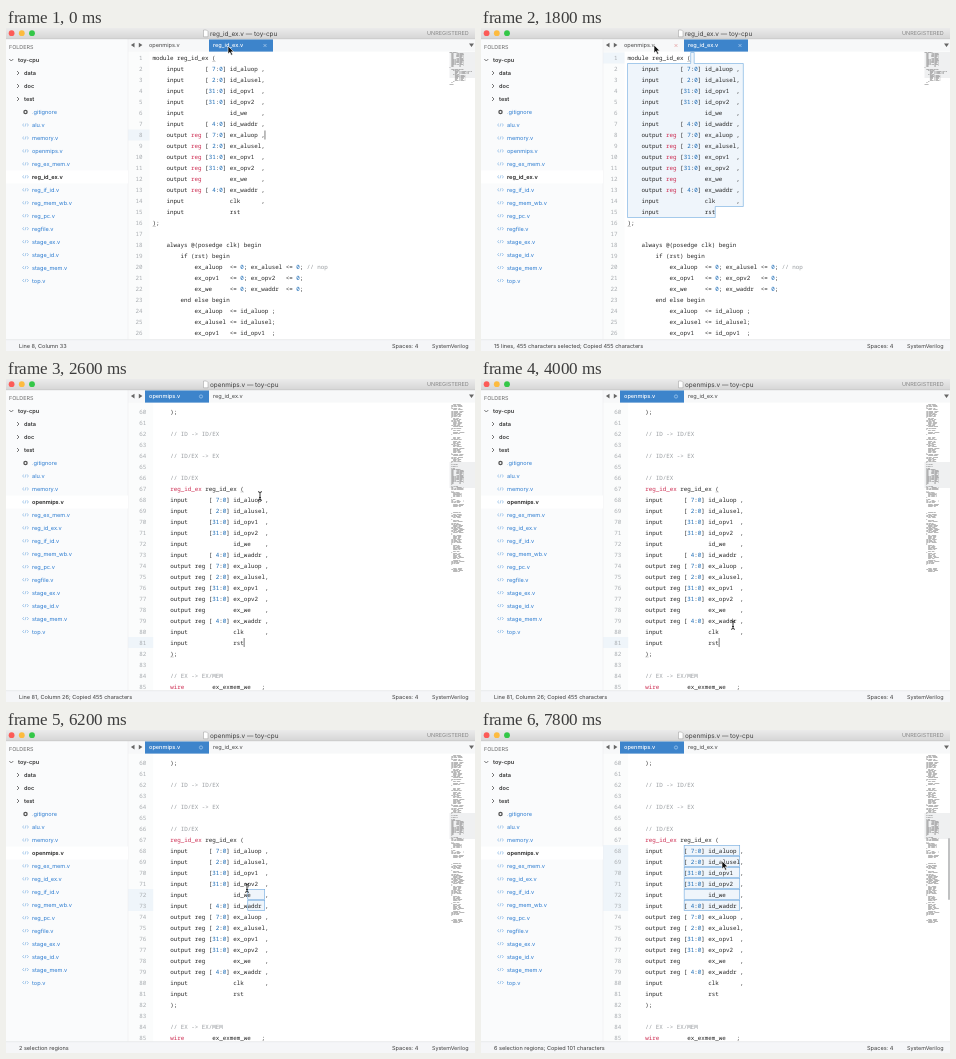
An HTML page for the animation above (8 s loop, 469 by 323 pixels).

```html
<!DOCTYPE html>
<html lang="en">
<head>
<meta charset="utf-8">
<title>Code editor</title>
<style>
html, body { margin: 0; width: 100%; height: 100%; overflow: hidden; background: #fff; }
svg { display: block; width: 469px; height: 323px; }
text { font: 5.6px Inter, sans-serif; fill: #3c3c3c; white-space: pre; text-rendering: geometricPrecision; }
.code text { font: 5.85px "Noto Sans Mono", monospace; fill: #262626; }
.code .num { fill: #a8acb0; text-anchor: end; }
.comment { fill: #979b9f; }
.keyword { fill: #cc2b50; }
.number { fill: #1769b5; }
.file { fill: #2b7bd0; }
.bold { font-weight: 600; fill: #333; }
.active { font-weight: 600; fill: #222; }
.line { fill: none; stroke: #555; stroke-width: .8; }
.sel { fill: #eff5fb; stroke: #6fa9df; stroke-width: .6; }
</style>
</head>
<body>
<svg viewBox="0 0 469 323">
  <defs>
    <linearGradient id="bar" x2="0" y2="1"><stop stop-color="#ebebeb"/><stop offset="1" stop-color="#d5d5d5"/></linearGradient>
  </defs>
  <rect width="469" height="323" fill="#fff"/>
  <g id="marks"></g>
  <g id="code" class="code"></g>
  <g id="map"></g>
  <g id="caret"></g>
  <rect x="122" y="11" width="347" height="12.6" fill="#f7f8f9"/>
  <g id="tabs"></g>
  <path d="M128.5 14.8v4.6l-3.6-2.3zM132.8 14.8v4.6l3.6-2.3zM463 15.5h5l-2.5 3.6z" fill="#666"/>
  <rect y="11" width="122" height="301" fill="#fafbfc"/>
  <path d="M122 11V312" stroke="#e8eaec" stroke-width=".5"/>
  <g id="side"></g>
  <rect y="311.5" width="469" height="11.5" fill="#f5f6f8"/>
  <path d="M0 311.7H469" stroke="#dfe2e5" stroke-width=".6"/>
  <text id="status" x="13" y="319.5" style="font-size:5.55px"></text>
  <text x="386" y="319.5">Spaces: 4</text>
  <text x="426" y="319.5" style="font-size:5.4px">SystemVerilog</text>
  <rect width="469" height="11" fill="url(#bar)"/>
  <path d="M0 10.8H469" stroke="#bcbcbc" stroke-width=".5"/>
  <circle cx="5.6" cy="5.2" r="2.9" fill="#fc5b57"/>
  <circle cx="15.8" cy="5.2" r="2.9" fill="#fdbb3f"/>
  <circle cx="26" cy="5.2" r="2.9" fill="#34c748"/>
  <path d="M197.5 2h3l1.5 1.5V8.8h-4.5z" fill="#fff" stroke="#999" stroke-width=".5"/>
  <text id="title" x="204" y="7.6" style="font-size:6.4px"></text>
  <text x="421" y="7.3" style="fill:#888;font-size:5.5px">UNREGISTERED</text>
  <g id="mouse"></g>
</svg>
<script>
const $ = id => document.getElementById(id);
const CHAR = 3.51, ROW = 11, FRAME = 200, LOOP = 8000;

const ports = [
  ...["[ 7:0] id_aluop ,", "[ 2:0] id_alusel,", "[31:0] id_opv1  ,", "[31:0] id_opv2  ,",
    "       id_we    ,", "[ 4:0] id_waddr ,"].map(p => "    input      " + p),
  ...["[ 7:0] ex_aluop ,", "[ 2:0] ex_alusel,", "[31:0] ex_opv1  ,", "[31:0] ex_opv2  ,",
    "       ex_we    ,", "[ 4:0] ex_waddr ,"].map(p => "    output reg " + p),
  "    input             clk      ,",
  "    input             rst"
];

const signals = ["aluop ", "alusel", "opv1  ", "opv2  ", "we    ", "waddr "];
const registerLines = ["module reg_id_ex (", ...ports, ");", "",
  "    always @(posedge clk) begin",
  "        if (rst) begin",
  "            ex_aluop  <= 0; ex_alusel <= 0; // nop",
  "            ex_opv1   <= 0; ex_opv2   <= 0;",
  "            ex_we     <= 0; ex_waddr  <= 0;",
  "        end else begin",
  ...signals.map(s => `            ex_${s} <= id_${s};`),
  "        end", "    end", "", "endmodule"];

// Lines outside the visible area only appear in the minimap.
let seed = 7;
const random = () => (seed = seed * 16807 % 2147483647) / 2147483647;
const filler = count => Array.from({ length: count }, () => {
  const r = random();
  if (r < .14) return "";
  if (r < .25) return "    );";
  return "    " + (r < .6 ? "wire " : "    .") + "x".repeat(4 + random() * 7) +
    " ".repeat(1 + random() * 3) + "x".repeat(3 + random() * 8) + ",";
});

const head = [...filler(59), "    );", "", "    // ID -> ID/EX", "", "    // ID/EX -> EX", "",
  "    // ID/EX", "    reg_id_ex reg_id_ex ("];
const tail = ["    );", "", "    // EX -> EX/MEM", "    wire        ex_exmem_we   ;",
  "    wire [ 4:0] ex_exmem_waddr;", "    wire [31:0] ex_exmem_wdata;", "", "    // EX",
  "    stage_ex stage_ex (", "        .aluop (ex_aluop ),", "        .alusel(ex_alusel),",
  "        .opv1  (ex_opv1  ),", "        .opv2  (ex_opv2  ),", "    );", "",
  "    // EX/MEM", "    wire        mem_we        ;", "    wire [ 4:0] mem_waddr     ;", ...filler(70)];

const docs = {
  register: { name: "reg_id_ex.v", lines: registerLines, first: 1, x: 146.5, y: 30, gutter: 136.5, words: "reg|wire" },
  empty: { name: "openmips.v", lines: [...head, ...tail], first: 60, x: 150.2, y: 32.5, gutter: 140.3, words: "wire" }
};
docs.pasted = { ...docs.empty, lines: [...head, ...ports, ...tail] };

const colX = (doc, col) => doc.x + col * CHAR;
const rowTop = (doc, line) => doc.y + (line - doc.first) * ROW - ROW / 2;

function highlight(line, words) {
  const pattern = new RegExp(`(//.*)|(\\b(?:${words})\\b|^ *(?!module)\\w+(?= \\w+ \\())|(\\b\\d+\\b)`, "g");
  return line.replace(/</g, "&lt;").replace(pattern, (all, comment, keyword) =>
    `<tspan class="${comment ? "comment" : keyword ? "keyword" : "number"}">${all}</tspan>`);
}

function codeMarkup(doc) {
  return doc.lines.slice(doc.first - 1, doc.first + 25).map((line, i) => {
    const y = doc.y + i * ROW + 2;
    return `<text class="num" x="${doc.gutter}" y="${y}">${doc.first + i}</text>` +
      `<text x="${doc.x}" y="${y}">${highlight(line, doc.words)}</text>`;
  }).join("");
}

function mapMarkup(doc) {
  let path = "";
  doc.lines.forEach((line, i) => {
    for (const run of line.matchAll(/\S+/g))
      path += `M${443.5 + run.index * .45} ${24.5 + i}h${run[0].length * .45}`;
  });
  return `<rect x="443.5" y="${23 + doc.first}" width="25.5" height="26" fill="#eff0f1"/>` +
    `<path d="${path}" stroke="#666" stroke-width=".7" opacity=".65"/>`;
}
for (const doc of Object.values(docs)) {
  doc.code = codeMarkup(doc);
  doc.map = mapMarkup(doc);
}

const files = ["alu", "memory", "openmips", "reg_ex_mem", "reg_id_ex", "reg_if_id", "reg_mem_wb",
  "reg_pc", "regfile", "stage_ex", "stage_id", "stage_mem", "top"];

function sidebar(active) {
  let out = '<text x="3" y="21" style="font-size:5.4px;fill:#666">FOLDERS</text>' +
    '<path class="line" d="M3.3 31l2 2 2-2"/><text class="bold" x="12" y="34">toy-cpu</text>';
  ["data", "doc", "test"].forEach((name, i) => {
    const y = 45 + i * 13;
    out += `<path class="line" d="M11 ${y - 2}l2 2-2 2"/><text class="bold" x="18" y="${y + 2}">${name}</text>`;
  });
  out += '<circle cx="19.5" cy="84" r="1.6" fill="none" stroke="#555" stroke-width="1.3"/>' +
    '<text class="file" x="26" y="86">.gitignore</text>';
  files.forEach((file, i) => {
    const y = 97 + i * 12.96, name = file + ".v", on = name === active;
    if (on) out += `<rect y="${y - 6.5}" width="122" height="13" fill="#fff"/>`;
    out += `<path d="M18 ${y - 1.4}l-1.5 1.4 1.5 1.4M21 ${y - 1.4}l1.5 1.4-1.5 1.4M20 ${y - 1.6}l-1 3.2" fill="none" stroke="#72a9e0" stroke-width=".6"/>` +
      `<text class="${on ? "active" : "file"}" x="26" y="${y + 2}">${name}</text>`;
  });
  return out;
}

const cross = (x, color) => `<path d="M${x - 1.4} 16.1l2.8 2.8m0-2.8l-2.8 2.8" stroke="${color}" stroke-width=".7"/>`;

function tabs(t, doc) {
  const first = doc !== docs.register;
  const label = (x, name, on) => `<text x="${x}" y="19.3" style="${on ? "fill:#fff;font-weight:500" : "fill:#444"}">${name}</text>`;
  let out = `<rect x="${first ? 139 : 203}" y="11.4" width="64" height="12.2" fill="#3d84cb"/>` +
    label(143, "openmips.v", first) + label(207, "reg_id_ex.v", !first);
  if (!first) out += cross(259, "#b9d5f0");
  if (doc === docs.pasted) out += '<circle cx="195" cy="17.5" r="1.6" fill="none" stroke="#a9cff2" stroke-width=".7"/>';
  else if (first) out += cross(195, "#b9d5f0");
  else if (t >= 1600) out += cross(195, "#e39a9a");
  return out;
}

// Latest entry whose time has been reached: [time, ...values]
const latest = (list, t) => list.filter(item => item[0] <= t).pop();

const blockDrag = [[800, 15, 25], [1000, 8, 28], [1200, 1, 18]];
const columnDrag = [[6000, 73, 31], [6200, 72, 26], [6400, 70, 19], [6600, 68, 15]];

const gutter = doc => `<rect x="122" y="23" width="${doc.x - 125}" height="289" fill="#fbfcfc"/>`;
const rowMark = (doc, line) =>
  `<rect x="122" y="${rowTop(doc, line)}" width="${doc.x - 125}" height="11" fill="#eff5fa"/>`;

function blockSelection(doc, line, col) {
  const x = c => colX(doc, c), top = n => rowTop(doc, n);
  const end = doc.lines[line - 1].length + 1;
  return `<path class="sel" d="M${x(col)} ${top(line)}H${x(end)}V${top(line + 1)}H${x(33)}V${top(15)}` +
    `H${x(25)}V${top(16)}H${x(0)}V${top(line + 1)}H${x(col)}Z"/>`;
}

function editorState(t) {
  if (t < 2000) {
    const doc = docs.register, drag = latest(blockDrag, t);
    if (!drag) return { doc, line: 8, col: 32, since: 0, status: "Line 8, Column 33", marks: rowMark(doc, 8) };
    const [since, line, col] = drag;
    if (line === 15) return { doc, line, col, since, status: "Line 15, Column 26", marks: rowMark(doc, 15) };
    const chars = doc.lines[line - 1].length - col + 1 + (14 - line) * 33 + 25;
    const status = `${16 - line} lines, ${chars} characters selected` + (t >= 1600 ? "; Copied 455 characters" : "");
    return { doc, line, col, since, status, marks: rowMark(doc, line) + blockSelection(doc, line, col) };
  }
  if (t < 6000) {
    const pasted = t >= 2600, doc = pasted ? docs.pasted : docs.empty, line = pasted ? 81 : 67;
    return { doc, line, col: 25, since: pasted ? 2600 : 2000, marks: rowMark(doc, line),
      status: `Line ${line}, Column 26; Copied 455 characters` };
  }
  const doc = docs.pasted, [since, line, drag] = latest(columnDrag, t);
  if (line === 73) return { doc, line, col: 31, since, status: "Line 73, Column 32", marks: rowMark(doc, 73) };
  let marks = "";
  for (let n = line; n <= 73; n++)
    marks += rowMark(doc, n) + `<rect class="sel" x="${colX(doc, drag) + .3}" y="${rowTop(doc, n) + .4}" width="${(31 - drag) * CHAR - .6}" height="10.2"/>`;
  const status = `${74 - line} selection regions` + (t >= 7600 ? "; Copied 101 characters" : "");
  return { doc, status, marks };
}

function brackets(doc) {
  const open = doc === docs.register ? 1 : 67;
  const close = doc === docs.register ? 16 : doc === docs.pasted ? 82 : 68;
  const mark = (line, col) => `<path d="M${colX(doc, col)} ${rowTop(doc, line) + 9}h${CHAR}" stroke="#aaa" stroke-width=".5"/>`;
  return mark(open, doc.lines[open - 1].length - 1) + mark(close, doc.lines[close - 1].indexOf(")"));
}

const route = [[0, 222, 18], [200, 226, 50], [400, 236, 130], [600, 235, 184], [800, 235, 184],
  [1000, 245, 107], [1200, 211, 30], [1400, 211, 30], [1600, 182, 22], [1800, 173, 17], [2000, 173, 17],
  [2200, 222, 75], [2400, 244, 110], [2600, 254, 117], [3200, 256, 165], [4000, 252, 246],
  [4800, 257, 215], [5400, 260, 182], [5800, 260, 177], [6000, 260, 177], [6600, 203, 120],
  [7000, 201, 119], [7200, 206, 119], [7800, 241, 131]];

function pointer(t) {
  const from = latest(route, t), to = route[route.indexOf(from) + 1] || from;
  const k = to === from ? 0 : (t - from[0]) / (to[0] - from[0]);
  const x = from[1] + (to[1] - from[1]) * k, y = from[2] + (to[2] - from[2]) * k;
  const arrow = y < 24 || t > 7000;
  const shape = arrow
    ? '<path d="M0 0V8l1.9-1.7 1.3 2.9 1.4-.6-1.3-2.8H5.8z" fill="#111" stroke="#fff" stroke-width=".6"/>'
    : '<path d="M-2-4.3Q0-4.3 0-3V3Q0 4.3-2 4.3M2-4.3Q0-4.3 0-3M0 3Q0 4.3 2 4.3M-1 1.5h2" fill="none" stroke="#222" stroke-width=".9"/>';
  return `<g transform="translate(${x} ${y})">${shape}</g>`;
}

let shownTime = -1, shownDoc;
function render(t) {
  const { doc, line, col, since, status, marks } = editorState(t);
  if (doc !== shownDoc) {
    $("code").innerHTML = doc.code;
    $("side").innerHTML = sidebar(doc.name);
    $("title").textContent = doc.name + " — toy-cpu";
    shownDoc = doc;
  }
  $("marks").innerHTML = gutter(doc) + marks;
  $("tabs").innerHTML = tabs(t, doc);
  $("status").textContent = status;
  $("map").innerHTML = doc.map + (t >= 7600 ? '<rect x="467" y="108" width="2" height="62" rx="1" fill="#c0c1c2"/>' : "");
  const lit = line && (t - since) % 1000 < 600;
  $("caret").innerHTML = (line ? brackets(doc) : "") +
    (lit ? `<rect x="${colX(doc, col) - .2}" y="${rowTop(doc, line) + 1}" width=".7" height="9" fill="#444"/>` : "");
  $("mouse").innerHTML = pointer(t);
}

const start = performance.now();
function tick() {
  const t = Math.floor((performance.now() - start) % LOOP / FRAME) * FRAME;
  if (t !== shownTime) render(shownTime = t);
  requestAnimationFrame(tick);
}
tick();
</script>
</body>
</html>
```
